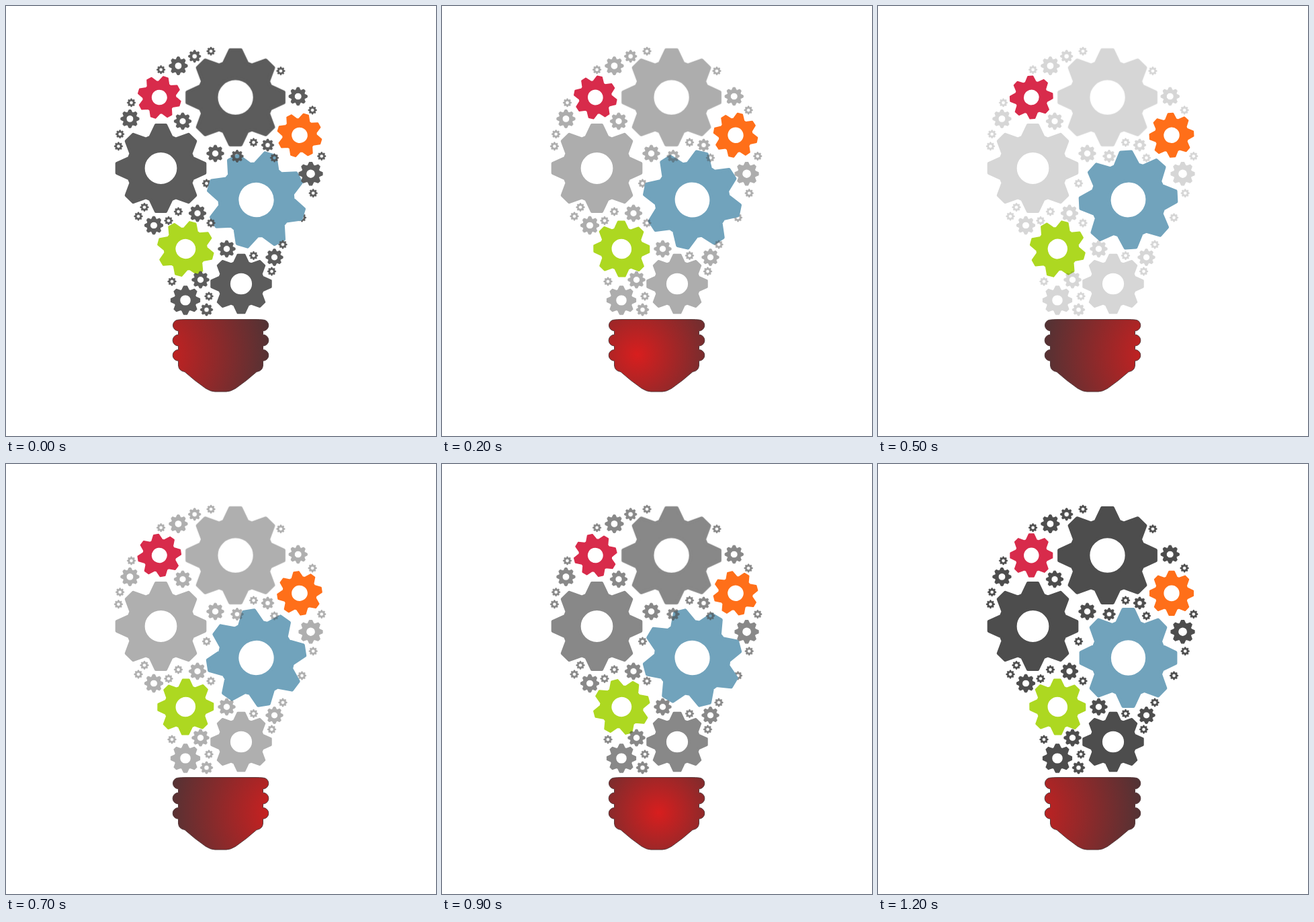
An HTML page for the animation above (1300 ms loop, 640 by 640 pixels).

```html
<!DOCTYPE html>
<html lang="en">
<head>
<meta charset="utf-8">
<title>Gear bulb</title>
<style>
  html, body { margin: 0; width: 100%; height: 100%; overflow: hidden; background: #fff; }
  svg { display: block; width: 100vw; height: 100vh; }
</style>
</head>
<body>
<svg viewBox="0 0 640 640">
  <defs>
    <radialGradient id="glow" gradientUnits="userSpaceOnUse" cy="519">
      <stop offset="0" stop-color="#d81e1e"/>
      <stop offset="1" stop-color="#4d3335"/>
    </radialGradient>
  </defs>
  <g id="under" fill="#4d4d4d" stroke="#4d4d4d"></g>
  <g id="colored"></g>
  <g id="over" fill="#4d4d4d" stroke="#4d4d4d"></g>
  <path fill="url(#glow)" stroke="#4d3335" stroke-width=".9" d="M257 467Q261 466.5 268 466.5H371Q378 466.5 382.5 467
    a8.3 8.3 0 0 1 0 16.6v5.6a8.4 8.4 0 0 1 0 16.8v5.6a8.3 8.3 0 0 1 0 16.6V535Q382 543 373 544.5
    Q358 558 342 569Q334 574 328 574H311Q305 574 297 569Q281 558 266 544.5Q257 543 256.5 535V528.2
    a8.3 8.3 0 0 1 0-16.6v-5.6a8.4 8.4 0 0 1 0-16.8v-5.6a8.3 8.3 0 0 1 .5-16.6Z"/>
</svg>
<script>
const FRAME = 100, COUNT = 13;
const ROUNDING = 0.07;
const SPECK = 6.5, TINY = 9.5, SMALL = 13, MEDIUM = 14;

const byId = id => document.getElementById(id);
const radians = degrees => degrees * Math.PI / 180;

// Unit gear: eight tapered teeth around a hole; the round stroke softens corners.
function gearPath() {
  const corners = [[-18.5, 0.73], [-6.3, 0.966], [6.3, 0.966], [18.5, 0.73]];
  const points = [];
  for (let tooth = 0; tooth < 8; tooth++) {
    for (const [offset, r] of corners) {
      const a = radians(tooth * 45 + offset);
      points.push(`${r * Math.sin(a)} ${-r * Math.cos(a)}`);
    }
  }
  const hole = 0.35 + ROUNDING / 2;
  return `M${points.join("L")}ZM${hole} 0A${hole} ${hole} 0 1 0 ${-hole} 0A${hole} ${hole} 0 1 0 ${hole} 0Z`;
}

const GEAR = gearPath();

function addGear(layer, x, y, r, color) {
  const gear = document.createElementNS("http://www.w3.org/2000/svg", "path");
  gear.setAttribute("d", GEAR);
  gear.setAttribute("fill-rule", "evenodd");
  gear.setAttribute("stroke-width", ROUNDING);
  gear.setAttribute("stroke-linejoin", "round");
  if (color) {
    gear.setAttribute("fill", color);
    gear.setAttribute("stroke", color);
  }
  // Gears are a touch wider than tall.
  const turn = angle =>
    gear.setAttribute("transform", `translate(${x} ${y}) rotate(${angle}) scale(${r * 1.01} ${r * 0.99})`);
  turn(0);
  byId(layer).append(gear);
  return turn;
}

// Places gears along the inside of the round glass, by clockwise angle from the top.
function addRim(r, ...angles) {
  const distance = 158.5 - 1.1 * r;
  for (const angle of angles) {
    const a = radians(angle);
    addGear("over", 318.5 + distance * Math.sin(a), 218 - distance * Math.cos(a), r);
  }
}

function addInside(layer, r, ...centers) {
  centers.forEach(([x, y]) => addGear(layer, x, y, r));
}

addInside("over", 74, [341.5, 136]);
addInside("over", 67.5, [230.5, 241.5]);
addInside("over", 45.5, [350, 413.5]);
addInside("over", 22, [267, 438]);

addRim(18, 103.2);
addRim(MEDIUM, -69.5, -25.7, 54.3);
addRim(TINY, -14.8);
addRim(SPECK, -86.5, -79.6, -60.7, -35.5, -5.1, 36.7, 65.4, 92.1, 113.6);

addInside("over", MEDIUM, [220, 326.5]);
addInside("over", SMALL, [263, 171.5], [311.5, 219.5], [285, 308.5], [328.5, 361.5], [399.5, 374], [289.5, 407.5]);
addInside("over", TINY, [344, 223.5], [389.5, 207], [298.5, 452]);
addInside("over", SPECK, [368.5, 203], [399.5, 226], [206, 299.5], [197, 313], [242, 319.5], [256.5, 306],
  [305, 323], [368.5, 371.5], [412, 355], [395.5, 395], [247, 410], [302, 432]);
addInside("under", SPECK, [440.5, 315], [298.5, 264]);

const spinners = [
  addGear("colored", 228.3, 136, 32.5, "#d82b4b"),
  addGear("colored", 437, 192.3, 33.5, "#ff6f19"),
  addGear("colored", 372.5, 288.5, 74, "#71a3bc")
];
const turnGreen = addGear("colored", 267.3, 361.5, 42.2, "#add821");

// Linear interpolation through [step, value] key points.
function track(step, ...keys) {
  const next = Math.max(1, keys.findIndex(([at]) => at >= step));
  const [from, a] = keys[next - 1], [to, b] = keys[next];
  return a + (b - a) * (step - from) / (to - from);
}

function draw(time) {
  const step = Math.floor(time / FRAME) % COUNT;

  const spin = track(step, [0, 17], [2, 57], [3, 92], [12, 270]);
  spinners.forEach(turn => turn(spin));
  turnGreen(track(step, [0, 15], [2, 45], [3, 75], [9, 165], [12, 225]));

  const opacity = track(step, [0, 0.916], [2, 0.46], [4, 0.12], [12, 1]);
  byId("under").setAttribute("opacity", opacity);
  byId("over").setAttribute("opacity", opacity);

  const sway = 112 * Math.cos(2 * Math.PI * (step - 5.8) / COUNT);
  byId("glow").setAttribute("cx", 320 + sway);
  byId("glow").setAttribute("r", 130 + 0.55 * Math.abs(sway));
}

function tick() {
  draw(performance.now());
  requestAnimationFrame(tick);
}
tick();
</script>
</body>
</html>
```
